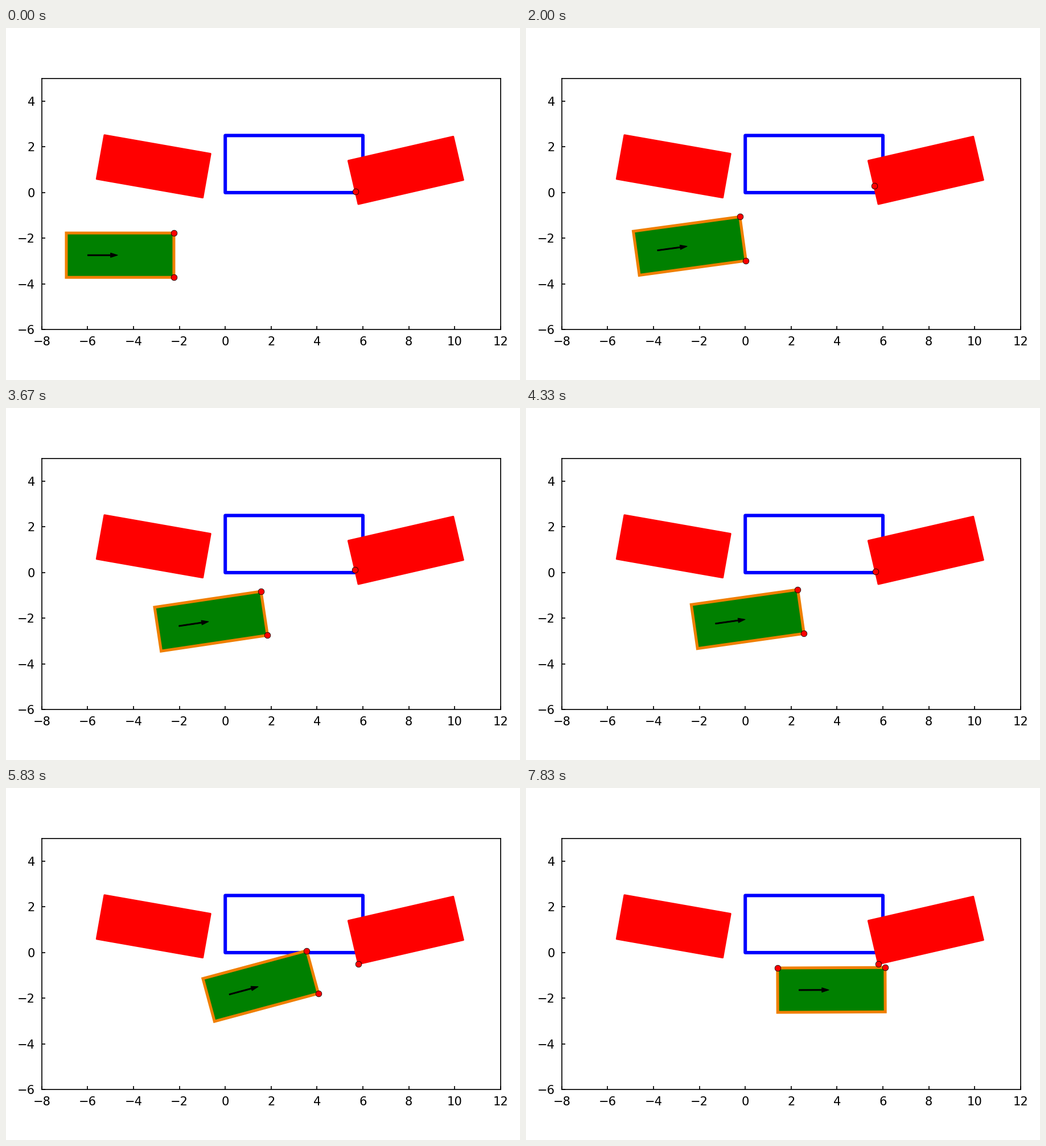
Write a matplotlib script that moves like this. It is 903 by 620 pixels and loops after 8000 ms.

```python
import numpy as np
import matplotlib.pyplot as plt
from matplotlib.animation import FuncAnimation
from matplotlib.patches import Polygon

W, H, DPI = 903, 620, 128
PX = 72 / DPI                     # points per pixel
STEPS, HOLD, LOOP = 48, 5, 8000   # each pose is held for HOLD ticks

# car body measured from the rear axle
REAR, FRONT, HALF = 0.929, 3.76, 0.971
MID = (FRONT - REAR) / 2
START = (-6, -2.74)

# step: heading in degrees
TURNS = {0: 0, 6: 6.6, 12: 7.8, 14: 3.7, 22: 8.5, 27: 8, 30: 17.1,
         33: 19.4, 35: 15.1, 37: 13, 42: 1, 44: -1.2, 47: 0.25}


def box(x0, y0, x1, y1):
    """Corners, starting with the right-hand side."""
    return np.array([(x1, y1), (x1, y0), (x0, y0), (x0, y1)])


def smooth(t, ts, vs):
    """Monotone cubic through the points (ts, vs)."""
    h = np.diff(ts)
    d = np.diff(vs) / h
    m = np.zeros(len(ts))
    m[0], m[-1] = d[0], d[-1]
    for i in range(1, len(d)):
        if d[i - 1] * d[i] > 0:
            m[i] = 2 * d[i - 1] * d[i] / (d[i - 1] + d[i])
    i = np.clip(np.searchsorted(ts, t, side="right") - 1, 0, len(d) - 1)
    u = (t - ts[i]) / h[i]
    return ((2 * u**3 - 3 * u**2 + 1) * vs[i] + (3 * u**2 - 2 * u**3) * vs[i + 1]
            + h[i] * ((u**3 - 2 * u**2 + u) * m[i] + (u**3 - u**2) * m[i + 1]))


def heading(t):
    return np.radians(smooth(t, np.array(list(TURNS)), np.array(list(TURNS.values()))))


def drive():
    """Rear axle position at every step, following the heading."""
    t = np.arange(STEPS - 1) + 0.5
    speed = 0.182 - 0.06 * np.exp(-(t - 28.5) ** 2)    # slows for the sharp turn
    a = heading(t)
    moves = np.column_stack([speed * np.cos(a), speed * np.sin(a)])
    return np.vstack([START, START + np.cumsum(moves, axis=0)])


def place(shape, pos, a):
    c, s = np.cos(a), np.sin(a)
    return shape @ np.array([(c, s), (-s, c)]) + pos


def edges(poly):
    return list(zip(poly, np.roll(poly, -1, axis=0)))


def foot(p, a, b):
    """Nearest point to p on segment ab, and its distance."""
    t = np.clip(np.dot(p - a, b - a) / np.dot(b - a, b - a), 0, 1)
    q = a + t * (b - a)
    return q, np.hypot(*(p - q))


def contact(car, block):
    """The car edge facing the block, and the block's nearest point."""
    pairs = [foot(p, a, b) for p in car for a, b in edges(block)]
    pairs += [(p, foot(p, a, b)[1]) for p in block for a, b in edges(car)]
    point = min(pairs, key=lambda e: round(e[1], 7))[0]
    a, b = min(edges(car), key=lambda e: round(foot(point, *e)[1], 7))
    return np.array([a, b, point])


fig = plt.figure(figsize=(W / DPI, H / DPI), dpi=DPI, facecolor="white")
ax = fig.add_axes([62.8 / W, 1 - 531.3 / H, 806 / W, 442.5 / H])
ax.set(xlim=(-8, 12), ylim=(-6, 5),
       xticks=range(-8, 13, 2), yticks=range(-6, 5, 2))
ax.tick_params(direction="in", length=6.3 * PX, width=1.7 * PX,
               pad=11.6 * PX, labelsize=21 * PX, labelfontfamily="DejaVu Sans")
for spine in ax.spines.values():
    spine.set_linewidth(1.7 * PX)


def polygon(points, fill, edge, width, z, join="miter"):
    return ax.add_patch(Polygon(points, closed=True, facecolor=fill, edgecolor=edge,
                                linewidth=width * PX, joinstyle=join, zorder=z,
                                snap=False))


BODY = box(-REAR, -HALF, FRONT, HALF)
ARROW = np.array([(0, 0.025), (1, 0.025), (1, 0.1), (1.31, 0),
                  (1, -0.1), (1, -0.025), (0, -0.025)])
parked = BODY - (MID, 0)
left = place(parked, (-3.125, 1.15), np.radians(-10))
right = place(parked, (7.87, 0.975), np.radians(13))

polygon(box(0, 0, 6, 2.5), "none", "blue", 6, 2, "round")
for block in (left, right):
    polygon(block, "red", "red", 3.2, 2.1, "round")
body = polygon(BODY, "green", "#f07f00", 5, 2.2)
arrow = polygon(ARROW, "black", "black", 1, 2.3)
dots, = ax.plot([], [], "o", color="red", markersize=10.6 * PX,
                markeredgecolor="black", markeredgewidth=0.8 * PX, zorder=2.4)

track = drive()


def draw(tick):
    step = min((tick + 1) // HOLD, STEPS - 1)
    pose = track[step], heading(step)
    car = place(BODY, *pose)
    body.set_xy(car)
    arrow.set_xy(place(ARROW, *pose))
    dots.set_data(*contact(car, right).T)
    return body, arrow, dots


anim = FuncAnimation(fig, draw, frames=STEPS * HOLD, init_func=lambda: draw(0),
                     interval=LOOP / (STEPS * HOLD), repeat=True, repeat_delay=0)
plt.show()
```
